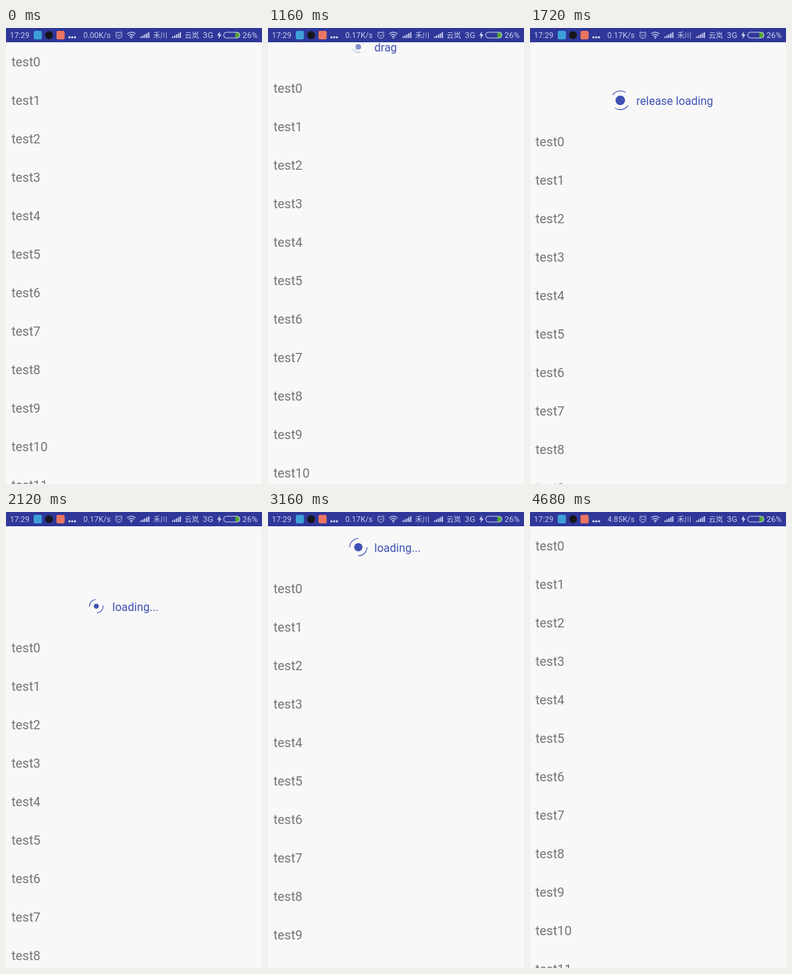
Animation, 360 px wide and 640 px high, one loop 4.76 s. Source, as an HTML page:

```html
<!DOCTYPE html>
<html lang="en">
<head>
<meta charset="utf-8">
<title>Pull to refresh</title>
<style>
  html, body { margin: 0; width: 100%; height: 100%; overflow: hidden; background: #f8f8f8; }
  svg { display: block; width: 360px; height: 640px; }
  text { font-family: Roboto, "Noto Sans CJK SC", "Noto Sans CJK", sans-serif; white-space: pre; }
  .row { font-size: 18px; fill: #757575; }
  #label { font-size: 16px; fill: #3f51b5; }
  #bar text { font-size: 11px; fill: #c9cdee; }
  #bar .cjk { font-size: 10px; }
  .line { fill: none; stroke: #c9cdee; }
</style>
</head>
<body>
<svg viewBox="0 0 360 640">
  <rect width="360" height="640" fill="#f8f8f8"/>
  <g id="list"></g>
  <g id="header">
    <g id="spinner">
      <circle id="dot" r="7" fill="#3f51b5"/>
      <path id="arcs" fill="none" stroke="#3f51b5" stroke-width="1.1"/>
    </g>
    <text id="label" x="149.5" y="-4.3"></text>
  </g>
  <g id="bar">
    <rect width="360" height="20" fill="#2f3799"/>
    <text x="5.5" y="14">17:29</text>
    <rect x="39" y="4" width="11.5" height="12" rx="2" fill="#3d9fd8"/>
    <circle cx="60.5" cy="10" r="5.5" fill="#16161c"/>
    <rect x="71" y="4" width="11.5" height="12" rx="2" fill="#ea7560"/>
    <g fill="#e2e4f6">
      <circle cx="89.2" cy="13" r="1.5"/>
      <circle cx="93.1" cy="13" r="1.5"/>
      <circle cx="97" cy="13" r="1.5"/>
    </g>
    <text id="speed" x="147.3" y="14" text-anchor="end"></text>
    <g class="line">
      <circle cx="158.7" cy="10.3" r="4.2"/>
      <path d="M156.6 9.5l2.1 1.8 2.2-1.8M153.8 7.2l2.4-2.2M163.6 7.2l-2.4-2.2"/>
      <path d="M170.3 8.4a8.4 8.4 0 0 1 12 0M172.3 10.6a5.6 5.6 0 0 1 8 0M174.2 12.6a3 3 0 0 1 4.2 0" stroke-width="1.2"/>
    </g>
    <circle cx="176.3" cy="14" r="1" fill="#c9cdee"/>
    <path id="signal" fill="#c9cdee"/>
    <text class="cjk" x="207" y="13.8">禾川</text>
    <text class="cjk" x="251.3" y="13.8">云岚</text>
    <text x="276.8" y="14" style="font-size:11.8px">3G</text>
    <path d="M301 4.8l-4 5.8h2.7l-1 4.6 4.4-6h-2.8z" fill="#d9dcf4"/>
    <path d="M322.5 6h2.5a4 4 0 0 1 0 8h-2.5z" fill="#52a832"/>
    <rect class="line" x="306" y="6" width="23" height="8" rx="4"/>
    <text x="332.5" y="14" style="font-size:11.5px">26%</text>
  </g>
</svg>
<script>
  const LOOP = 4760, STEP = 40;
  const DRAG = 930, RELEASE = 2063, CLOSE = 4290, SETTLE = 383;
  const SPIN = 766, SPIN_START = 1804;
  const HOLD = 60;

  const $ = id => document.getElementById(id);
  const list = $('list'), header = $('header'), spinner = $('spinner');
  const dot = $('dot'), arcs = $('arcs'), label = $('label'), speed = $('speed');

  for (let i = 0; i < 12; i++) {
    const row = document.createElementNS('http://www.w3.org/2000/svg', 'text');
    row.setAttribute('class', 'row');
    row.setAttribute('x', 7.7);
    row.setAttribute('y', 54 + i * 54);
    row.textContent = 'test' + i;
    list.append(row);
  }

  const bars = x => [0, 1, 2, 3, 4]
    .map(i => `M${x + i * 2.7} 14v${-2 - i * 1.5}h1.8V14z`).join('');
  $('signal').setAttribute('d', bars(189) + bars(233.5));

  const ease = p => (1 - Math.cos(Math.PI * Math.min(1, Math.max(0, p)))) / 2;

  // Finger drag with growing resistance
  function dragged(t) {
    const u = Math.max(0, t - DRAG);
    return 0.1609 * u - 3.4e-5 * u * (u - 230);
  }

  function offsetAt(t) {
    if (t < DRAG) return 0;
    if (t < RELEASE) return dragged(t);
    if (t < CLOSE) {
      const top = dragged(RELEASE);
      return top + (HOLD - top) * ease((t - RELEASE) / SETTLE);
    }
    return HOLD * (1 - ease((t - CLOSE) / SETTLE));
  }

  const move = (el, value) => el.setAttribute('transform', value);

  // Two quarter arcs; the radius shrinks while the line weight stays
  function arcPath(r) {
    const c = r * Math.SQRT1_2;
    return `M${-c} ${-c}A${r} ${r} 0 0 1 ${c} ${-c}M${c} ${c}A${r} ${r} 0 0 1 ${-c} ${c}`;
  }

  function draw(t) {
    const y = offsetAt(t);
    const shown = Math.min(1, y / HOLD);
    move(list, `translate(0 ${y})`);
    move(header, `translate(0 ${y})`);
    move(spinner, `translate(127 -10.6) scale(${shown})`);
    spinner.setAttribute('opacity', shown);

    const phase = ((t - SPIN_START) / SPIN + 10) % 1;
    const turn = ease(phase);
    const pulse = 1 - Math.abs(1 - 2 * turn);
    dot.setAttribute('r', 7 * (1 - 0.7 * pulse));
    arcs.setAttribute('d', arcPath(13.5 * (1 - 0.4 * pulse)));
    move(arcs, `rotate(${360 * turn})`);

    label.textContent = t >= RELEASE ? 'loading...' : y > HOLD ? 'release loading' : 'drag';
    speed.textContent = t < 640 ? '0.00K/s' : t < 3800 ? '0.17K/s' : '4.85K/s';
  }

  function tick() {
    const t = performance.now() % LOOP;
    draw(Math.floor(t / STEP) * STEP);
    requestAnimationFrame(tick);
  }
  tick();
</script>
</body>
</html>
```
